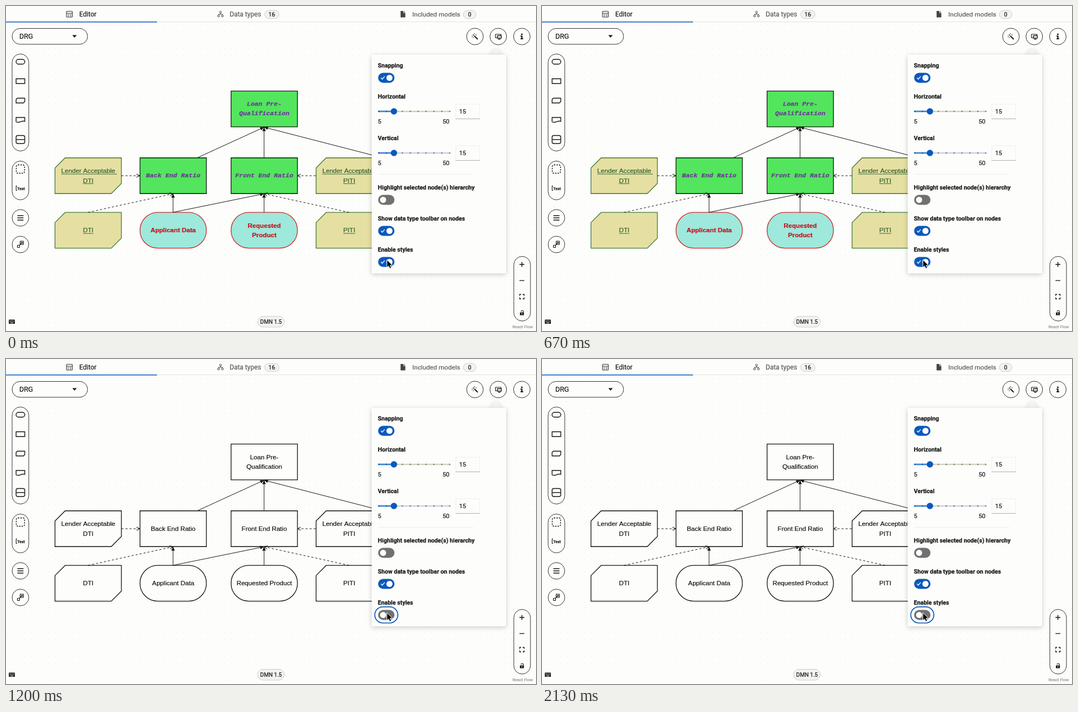
Write an HTML page with a canvas that moves like this. It is 955x586 px and loops after 2.2 s.

```html
<!DOCTYPE html>
<html lang="en">
<head>
<meta charset="utf-8">
<title>DMN editor</title>
<style>
html, body { margin: 0; width: 100%; height: 100%; overflow: hidden; background: #fdfdfb; }
canvas { display: block; width: 955px; height: 586px; }
</style>
</head>
<body>
<canvas id="stage" width="955" height="586"></canvas>
<script>
const c = document.getElementById('stage').getContext('2d');
const LOOP = 2200, STEP = LOOP / 33, CLICK = 13.5 * STEP, SLIDE = 250;
const UI = 'Roboto, "Open Sans", sans-serif';
const SANS = '"Liberation Sans", Arial, sans-serif';
const MONO = '"Liberation Mono", "Courier New", monospace';
const PAPER = '#fdfdfb', INK = '#151515', BLUE = '#0a59bd', GRAY = '#717171';
const GRID = 10.94;

function paint(fill, stroke, width = 1) {
  if (fill) { c.fillStyle = fill; c.fill(); }
  if (stroke) { c.strokeStyle = stroke; c.lineWidth = width; c.stroke(); }
}
function box(x, y, w, h, r, fill, stroke, width) {
  c.beginPath();
  c.roundRect(x, y, w, h, r);
  paint(fill, stroke, width);
}
function disc(x, y, r, fill, stroke, width) {
  c.beginPath();
  c.arc(x, y, r, 0, 7);
  paint(fill, stroke, width);
}
function poly(points, fill, stroke, width, open) {
  c.beginPath();
  points.forEach(([x, y]) => c.lineTo(x, y));
  if (!open) c.closePath();
  paint(fill, stroke, width);
}
function line(x1, y1, x2, y2, color = INK, width = 1) {
  poly([[x1, y1], [x2, y2]], null, color, width, true);
}
function text(s, x, y, font, color = INK, align = 'left') {
  c.font = font;
  c.fillStyle = c.strokeStyle = color;
  c.textAlign = align;
  c.lineWidth = 0.2;
  c.fillText(s, x, y);
  c.strokeText(s, x, y);
}

function grid() {
  c.fillStyle = '#e6e8ef';
  for (let y = 153.5 - 11 * GRID; y < 586; y += GRID)
    for (let x = 88 - 8 * GRID; x < 955; x += GRID)
      c.fillRect(Math.round(x), Math.round(y), 1, 1);
}

function edge(x1, y1, x2, y2, dashed) {
  c.setLineDash(dashed ? [3.65, 3.65] : []);
  line(x1, y1, x2, y2, INK, 1);
  c.setLineDash([]);
  c.save();
  c.translate(x2, y2);
  c.rotate(Math.atan2(y2 - y1, x2 - x1));
  if (dashed) poly([[-6, -3], [0, 0], [-6, 3]], null, INK, 1, true);
  else poly([[-7, -3.2], [0, 0], [-7, 3.2]], INK);
  c.restore();
}

function edges() {
  edge(345, 273.5, 465, 218.5);
  edge(465, 273.5, 465, 218.5);
  edge(680, 274, 465, 218.5);
  edge(301, 372, 301, 338.5);
  edge(301, 372, 465, 338.5);
  edge(465, 372, 465, 338.5);
  edge(208, 306, 241, 306, true);
  edge(558, 306, 525, 306, true);
  edge(148, 372, 301, 338.5, true);
  edge(618, 372, 465, 338.5, true);
}

const KINDS = {
  decision: { fill: '#53e55d', stroke: '#101810', ink: '#6a3699', font: 'italic bold 11.67px ' + MONO },
  source: { fill: '#e5dfa2', stroke: '#417a35', ink: '#2d5d2a', font: '11.67px ' + SANS },
  input: { fill: '#9ee8dc', stroke: '#c92a26', ink: '#c6101a', font: 'bold 11.67px ' + SANS }
};

function node(kind, x, y, lines, styled) {
  const k = KINDS[kind], w = 119.6, h = 64.5, cut = 18.2;
  const fill = styled ? k.fill : PAPER, stroke = styled ? k.stroke : '#111';
  if (kind === 'source') {
    poly([[x + cut, y], [x + w, y], [x + w, y + h - cut], [x + w - cut, y + h], [x, y + h], [x, y + cut]],
      fill, stroke, 1.3);
  } else {
    box(x, y, w, h, kind === 'input' ? 32 : 0, fill, stroke, 1.3);
  }
  const font = styled ? k.font : '11.67px ' + SANS, ink = styled ? k.ink : '#111';
  lines.forEach((s, i) => {
    const cx = x + w / 2;
    const by = y + h / 2 + 4 + (i - (lines.length - 1) / 2) * 17.3 - (styled && kind === 'decision' ? 1 : 0);
    text(s.trim(), cx, by, font, ink, 'center');
    if (styled && kind === 'source') {
      const left = cx - c.measureText(s.trim()).width / 2;
      line(left, by + 1.7, left + c.measureText(s).width, by + 1.7, ink, 0.9);
    }
  });
}

function nodes(styled) {
  const requested = styled ? ['Requested', 'Product'] : ['Requested Product'];
  const [x1, x2, x3, x4] = [0, 14, 29, 43].map(n => 88.3 + n * GRID);
  const [y1, y2, y3] = [0, 11, 20].map(n => 153.4 + n * GRID);
  node('decision', x3, y1, ['Loan Pre-', 'Qualification'], styled);
  node('source', x1, y2, ['Lender Acceptable ', 'DTI'], styled);
  node('decision', x2, y2, ['Back End Ratio'], styled);
  node('decision', x3, y2, ['Front End Ratio'], styled);
  node('source', x4, y2, ['Lender Acceptable ', 'PITI'], styled);
  node('source', x1, y3, ['DTI'], styled);
  node('input', x2, y3, ['Applicant Data'], styled);
  node('input', x3, y3, requested, styled);
  node('source', x4, y3, ['PITI'], styled);
}

function badge(x, w, s) {
  box(x, 8, w, 14.5, 7.2, '#f2f2f0', '#cfcfcf');
  text(s, x + w / 2, 19, '10.5px ' + UI, INK, 'center');
}

function tabs() {
  c.fillStyle = PAPER;
  c.fillRect(0, 0, 955, 29);
  line(0, 28.5, 955, 28.5, '#e4e4e2');
  c.fillStyle = BLUE;
  c.fillRect(0, 28, 272, 1.5);

  box(109, 9.5, 10.5, 10.5, 1, null, '#333', 1.1);
  line(109, 13, 119.5, 13, '#333');
  for (const y of [15.3, 17.8]) {
    line(111, y, 113.6, y, '#333');
    line(115, y, 117.7, y, '#333');
  }
  text('Editor', 132, 19, '12px ' + UI);

  poly([[383.3, 17], [383.3, 14.8], [389.7, 14.8], [389.7, 17]], null, '#444', 1, true);
  line(386.5, 12, 386.5, 15, '#444');
  disc(386.5, 11, 1.7, PAPER, '#444');
  disc(383, 18, 1.7, PAPER, '#444');
  disc(390, 18, 1.7, PAPER, '#444');
  text('Data types', 403, 19, '12px ' + UI, '#5a5a5a');
  badge(466, 26, '16');

  poly([[711, 9], [716, 9], [716, 12.5], [719.5, 12.5], [719.5, 20.5], [711, 20.5]], '#444');
  poly([[717, 9], [719.5, 11.5], [717, 11.5]], '#444');
  text('Included models', 732, 19, '11.75px ' + UI, '#5a5a5a');
  badge(824, 23, '0');
}

function topBar() {
  box(11, 40.5, 136, 28.5, 14.2, PAPER, '#333');
  text('DRG', 24, 59, '12.6px ' + UI);
  poly([[119.5, 52.5], [127.5, 52.5], [123.5, 57]], INK);

  for (const x of [845, 887, 929.5]) disc(x, 55, 15, PAPER, '#333');
  line(844, 54, 850, 60, INK, 2);
  line(841.5, 51.5, 843.2, 53.2, INK, 1.6);
  for (const [x, y] of [[840, 54.5], [844.5, 50], [847, 52], [842, 57]]) disc(x, y, 0.8, INK);

  box(882, 51, 10, 6.5, 0.5, PAPER, INK, 1.2);
  box(885.5, 53.5, 7, 4.5, 0.5, PAPER, INK, 1.4);
  line(886.5, 60.2, 891, 60.2, INK, 1.3);

  disc(929.5, 51, 1.5, INK);
  poly([[927, 53.5], [930.6, 53.5], [930.6, 58.3], [932, 58.3], [932, 60], [927, 60], [927, 58.3], [928.4, 58.3], [928.4, 55.2], [927, 55.2]], INK);
}

function palette() {
  box(11, 86.5, 30, 175, 15, PAPER, '#333');
  box(18.2, 96.2, 15.6, 8.6, 4, null, INK, 1.4);
  box(18.2, 131.2, 15.6, 8.6, 0, null, INK, 1.4);
  poly([[20.5, 166.2], [33.8, 166.2], [33.8, 172.3], [31.5, 174.8], [18.2, 174.8], [18.2, 168.5]], null, INK, 1.4);
  c.beginPath();
  c.moveTo(18.2, 209);
  c.lineTo(18.2, 201);
  c.lineTo(33.8, 201);
  c.lineTo(33.8, 208);
  c.bezierCurveTo(29, 205.5, 24, 212, 18.2, 209);
  paint(null, INK, 1.4);
  box(18.2, 233.5, 15.6, 14.5, 3, null, INK, 1.4);
  line(18.2, 240.8, 33.8, 240.8, INK, 1.4);

  box(11, 279.5, 30, 70, 15, PAPER, '#333');
  c.setLineDash([2.6, 1.9]);
  box(18.5, 286.5, 15, 15, 3, null, INK, 1.4);
  c.setLineDash([]);
  poly([[20, 324.5], [18.3, 324.5], [18.3, 332.5], [20, 332.5]], null, INK, 1.1, true);
  text('Text', 20.2, 331.5, 'bold 7px ' + UI);

  disc(26, 382, 15, PAPER, '#333');
  for (const y of [378, 382, 386]) line(20.5, y, 31.5, y, INK, 1.5);

  disc(26, 430, 15, PAPER, '#333');
  box(25.5, 424, 6, 6, 0.5, null, INK, 1.1);
  box(20.5, 431.5, 4, 4, 0.5, null, INK, 1.1);
  line(23.5, 432, 29, 426.5, INK, 1.1);
  poly([[26.7, 426], [29.5, 426], [29.5, 428.8]], null, INK, 1.1, true);
}

function corners() {
  box(915, 451.5, 30, 116.5, 15, PAPER, '#333');
  line(925.2, 466, 934, 466, INK, 1.5);
  line(929.6, 461.6, 929.6, 470.4, INK, 1.5);
  line(925.2, 495, 934, 495, INK, 1.3);
  for (const sx of [-1, 1]) for (const sy of [-1, 1]) {
    const x = 929.6 + sx * 4, y = 524 + sy * 4;
    poly([[x - sx * 2.6, y], [x, y], [x, y - sy * 2.6]], null, INK, 1.3, true);
  }
  box(926, 552.5, 7.2, 5, 0.5, INK);
  c.beginPath();
  c.arc(930.2, 551, 2, Math.PI, 0);
  c.lineTo(932.2, 553);
  paint(null, INK, 1.1);
  disc(929.6, 555, 0.9, PAPER);

  c.fillStyle = 'rgba(253,253,251,.7)';
  c.fillRect(910, 573, 45, 13);
  text('React Flow', 912.5, 581, '7.5px ' + UI, '#929292');

  box(453.5, 559.5, 48, 19.5, 9.7, '#f2f2f0', '#cfcfcf');
  text('DMN 1.5', 477.5, 573, '10px ' + UI, INK, 'center');

  box(5, 565.5, 11, 7.5, 1, INK);
  c.fillStyle = PAPER;
  for (let i = 0; i < 4; i++) {
    c.fillRect(6.3 + i * 2.3, 567, 1.2, 1);
    c.fillRect(6.3 + i * 2.3, 569, 1.2, 1);
  }
  c.fillRect(8, 571, 5, 0.9);
}

// pos: 1 is on, 0 is off
function toggle(y, on, pos = on ? 1 : 0) {
  box(670.5, y - 9, 29.5, 18, 9, on ? BLUE : GRAY);
  if (on) poly([[675.7, y], [678, y + 2.5], [682.3, y - 2.6]], null, '#fff', 1.4, true);
  disc(679.5 + pos * 11.5, y, 5.5, PAPER);
}

function slider(y, track) {
  const gap = 128 / 9;
  line(671, y, 799, y, track, 2.4);
  line(671, y, 699, y, '#3f83d6', 2.6);
  for (let i = 0; i < 10; i++) disc(671.5 + i * gap, y, 1.3, i < 2 ? BLUE : '#77778a');
  disc(699, y, 5.8, BLUE);
  text('5', 670, y + 22, '11px ' + UI);
  text('50', 799, y + 22, '11px ' + UI, INK, 'right');
  box(810.5, y - 13, 43, 26, 0, PAPER, '#efefed');
  line(810, y + 13.5, 854, y + 13.5, '#b4b4b4');
  text('15', 816.5, y + 4, '11px ' + UI);
}

function panel(styled, pos) {
  c.save();
  c.shadowColor = 'rgba(0,0,0,.2)';
  c.shadowBlur = 9;
  c.shadowOffsetY = 2;
  poly([[871, 88], [883, 76.5], [895, 88]], '#f4f4f2');
  box(659, 88, 242, 394, 0, PAPER);
  c.restore();

  const labels = [['Snapping', 111], ['Horizontal', 167], ['Vertical', 242],
    ['Highlight selected node(s) hierarchy', 331],
    ['Show data type toolbar on nodes', 387], ['Enable styles', 443]];
  for (const [s, y] of labels) text(s, 670, y, '600 10.7px ' + UI);

  toggle(129.5, true);
  slider(190, '#d2d2ba');
  slider(265, '#cfcfe2');
  line(671, 303.5, 842, 303.5, '#ececea');
  toggle(349.5, false);
  toggle(405.5, true);
  if (!styled) box(664.5, 446.8, 41.5, 29.2, 14.6, PAPER, BLUE, 1.7);
  toggle(461.5, styled, pos);
}

function cursor() {
  const x = 686.3, y = 457.5;
  poly([[x, y], [x, y + 14], [x + 3.2, y + 11.2], [x + 5.4, y + 16], [x + 8, y + 14.8],
    [x + 5.8, y + 10.2], [x + 10, y + 10]], '#000', '#fff', 1);
}

// standard "ease" curve, solved for its time coordinate
function ease(p) {
  if (p <= 0) return 0;
  if (p >= 1) return 1;
  const at = (u, a, b) => 3 * (1 - u) ** 2 * u * a + 3 * (1 - u) * u * u * b + u ** 3;
  let lo = 0, hi = 1;
  for (let i = 0; i < 20; i++) {
    const mid = (lo + hi) / 2;
    if (at(mid, 0.25, 0.25) < p) lo = mid; else hi = mid;
  }
  return at(lo, 0.1, 1);
}

function draw(ms) {
  const t = Math.floor((ms % LOOP + 5) / STEP) % 33 * STEP;
  const styled = t < CLICK;
  c.fillStyle = PAPER;
  c.fillRect(0, 0, 955, 586);
  grid();
  nodes(styled);
  edges();
  tabs();
  topBar();
  palette();
  corners();
  panel(styled, 1 - ease((t - CLICK) / SLIDE));
  cursor();
}

const start = performance.now();
function tick() {
  draw(performance.now() - start);
  requestAnimationFrame(tick);
}
tick();
</script>
</body>
</html>
```
